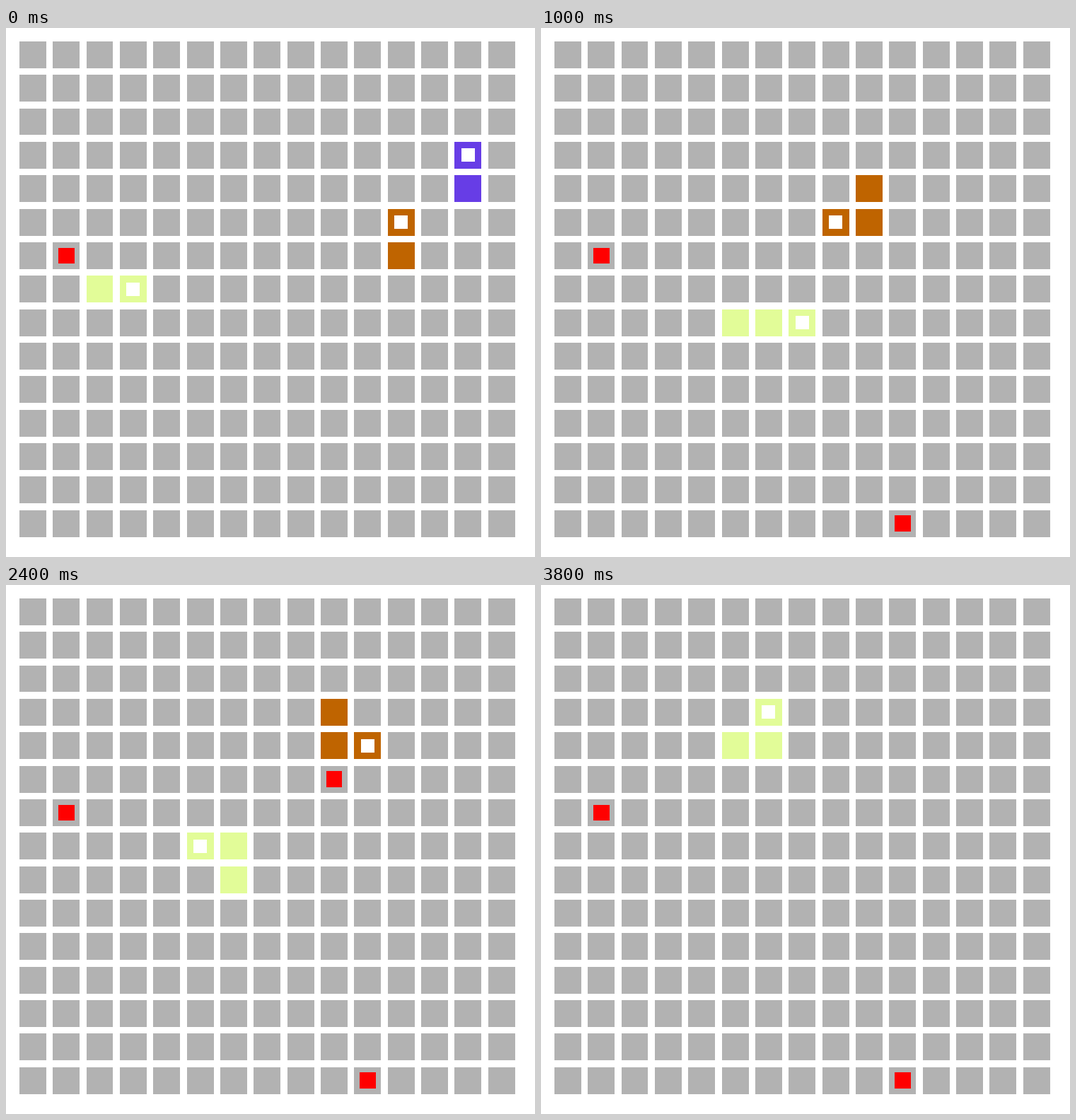
These frames come from a looping animation (748x748 px, 4 s). An HTML page with a canvas:

```html
<!DOCTYPE html>
<html lang="en">
<head>
<meta charset="utf-8">
<title>Snakes on a grid</title>
<style>
  html, body { margin: 0; width: 100%; height: 100%; overflow: hidden; background: #fff; }
  canvas { display: block; }
</style>
</head>
<body>
<canvas id="stage" width="748" height="748"></canvas>
<script>
const ctx = document.getElementById('stage').getContext('2d');
const CELLS = 15, STEP_MS = 200, STEPS = 20;
const UNIT = 748 / 79; // a cell is 4 units wide, the gap 1 unit
const MOVES = { U: [0, -1], D: [0, 1], L: [-1, 0], R: [1, 0] };

// Each snake walks its path from the start cell and vanishes when the path ends.
const snakes = [
  { color: '#673de6', start: [13, 4], path: 'ULLL' },
  { color: '#bf6400', start: [11, 6], path: 'ULULDLLURURDRULDLDR', eatsAt: 18 },
  { color: '#e2fc98', start: [2, 7], path: 'RDRRRRRDLULULURULURU' }
];

// Food is visible from step "from" until just before step "to".
const food = [
  { cell: [1, 6], from: 0, to: STEPS },
  { cell: [10, 14], from: 3, to: STEPS },
  { cell: [9, 5], from: 10, to: 18 }
];

for (const snake of snakes) {
  snake.trail = [snake.start];
  for (const move of snake.path) {
    const [x, y] = snake.trail.at(-1);
    const [dx, dy] = MOVES[move];
    snake.trail.push([x + dx, y + dy]);
  }
}

// Fills a cell, inset by some units and snapped to whole pixels.
function fillCell([col, row], color, inset = 0) {
  const near = i => Math.round(UNIT * (2 + 5 * i + inset));
  const far = i => Math.round(UNIT * (6 + 5 * i - inset));
  ctx.fillStyle = color;
  ctx.fillRect(near(col), near(row), far(col) - near(col), far(row) - near(row));
}

function drawSnake({ color, trail, eatsAt = Infinity }, step) {
  const head = step + 1;
  if (head >= trail.length) return;
  const length = step >= eatsAt ? 4 : 3;
  const body = trail.slice(Math.max(0, head + 1 - length), head + 1);
  for (const cell of body) fillCell(cell, color);
  fillCell(trail[head], '#fff', 1);
}

function draw(step) {
  ctx.fillStyle = '#fff';
  ctx.fillRect(0, 0, 748, 748);
  for (let row = 0; row < CELLS; row++)
    for (let col = 0; col < CELLS; col++) fillCell([col, row], '#b2b2b2');
  for (const { cell, from, to } of food)
    if (step >= from && step < to) fillCell(cell, '#f00', 0.8);
  for (const snake of snakes) drawSnake(snake, step);
}

function tick() {
  draw(Math.floor(performance.now() / STEP_MS) % STEPS);
  requestAnimationFrame(tick);
}
tick();
</script>
</body>
</html>
```
